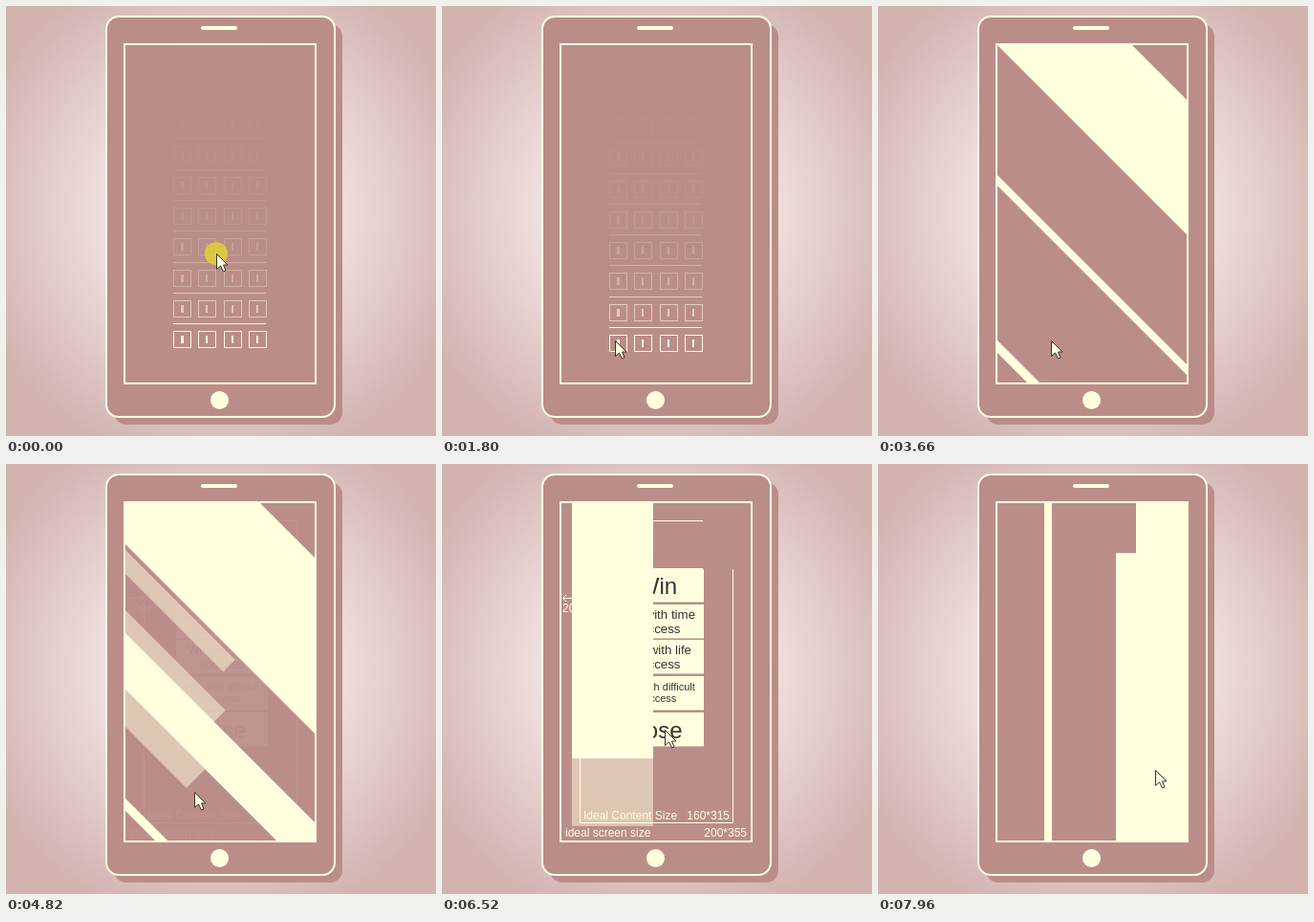
Animation of 450 by 450 pixels, one loop 8000 ms. Source, as an HTML page with a canvas:

```html
<!DOCTYPE html>
<html lang="en">
<head>
<meta charset="utf-8">
<title>Phone screen flow</title>
<style>
  html, body { margin: 0; width: 100%; height: 100%; overflow: hidden; background: #d2b3b0; }
  canvas { display: block; width: 100vw; height: 100vh; }
</style>
</head>
<body>
<canvas id="stage" width="450" height="450"></canvas>
<script>
const ctx = document.getElementById('stage').getContext('2d');
const ROSE = '#bb8d89', CREAM = '#ffffdf', INK = '#37322f';
const FONT = '"Liberation Sans", Arial, sans-serif';
const LOOP = 8000, STEP = 40, DASH = 240;

const clamp = v => Math.max(0, Math.min(1, v));
const ramp = (t, from, to) => clamp((t - from) / (to - from));
const easeOut = p => 1 - (1 - p) ** 2;
const mix = (a, b, p) => a + (b - a) * p;

function faded(alpha, paint) {
  if (alpha <= 0) return;
  ctx.save();
  ctx.globalAlpha *= alpha;
  paint();
  ctx.restore();
}

function rect(x, y, w, h, color) {
  ctx.fillStyle = color;
  ctx.fillRect(x, y, w, h);
}

function pill(x, y, w, h, radius, color) {
  ctx.fillStyle = color;
  ctx.beginPath();
  ctx.roundRect(x, y, w, h, radius);
  ctx.fill();
}

function frame(x, y, w, h, line, radius = 0) {
  ctx.beginPath();
  ctx.roundRect(x, y, w, h, radius);
  ctx.strokeStyle = CREAM;
  ctx.lineWidth = line;
  ctx.stroke();
}

function label(text, x, y, size = 12, color = CREAM, align = 'left') {
  ctx.font = `${size}px ${FONT}`;
  ctx.textAlign = align;
  ctx.fillStyle = color;
  ctx.fillText(text, x, y);
}

function drawPhone() {
  const glow = ctx.createRadialGradient(224, 215, 110, 224, 215, 270);
  glow.addColorStop(0, '#f0e2e0');
  glow.addColorStop(1, '#d2b3b0');
  rect(0, 0, 450, 450, glow);
  pill(113, 19, 239, 419, 13, ROSE);
  pill(105, 11, 239, 419, 13, ROSE);
  frame(105, 11, 239, 419, 2, 13);
  pill(204, 21, 38, 4, 2, CREAM);
  pill(214, 403, 19, 19, 9.5, CREAM);
}

// Endless list that follows the drag; rows grow dimmer towards the top
function drawKeypad(t) {
  const pitch = 32.3;
  const scroll = 165.3 * easeOut(ramp(t, 0, 900)) % pitch;
  const visible = 1 - ramp(t, 1880, 2400);
  for (let row = 0; row < 10; row++) {
    const y = Math.round(349.2 + scroll - row * pitch);
    const depth = Math.max(0, (353 - y) / pitch);
    faded(visible * 0.57 ** depth * clamp(1 - (y - 353) / 16), () => {
      rect(175, y - 17, 97, 1, CREAM);
      for (let col = 0; col < 4; col++) {
        const x = Math.round(175 + col * 26.4);
        frame(x + 0.5, y - 8.5, 18, 17, 1);
        rect(x + 8, y - 4, col ? 2 : 3, 8, CREAM);
      }
    });
  }
}

function drawButton(text, index) {
  const top = Math.round(109 + index * 37.7), middle = top + 18;
  const lines = text.split('|');
  rect(178, top, 96, 35.5, CREAM);
  if (lines.length === 1) return label(text, 225.5, middle + 8.5, 24, INK, 'center');
  const size = lines[0].length > 14 ? 11 : 13.3;
  lines.forEach((line, i) =>
    label(line, 225.5, Math.round(middle - 3.5 + i * size * 1.15), size, INK, 'center'));
}

function drawMenu() {
  frame(144.5, 59.5, 160, 316, 1);
  ctx.stroke(new Path2D('M127 140.5H143M130 137l-3.5 3.5 3.5 3.5M139 137l3.5 3.5-3.5 3.5'));
  label('20px', 126, 155);
  label('Ideal Content Size', 148, 372);
  label('160*315', 301, 372, 12, CREAM, 'right');
  label('ideal screen size', 129, 390);
  label('200*355', 319, 390, 12, CREAM, 'right');
  ['Win', 'Win with time|success', 'Win with life|success', 'Win with difficult|success', 'Lose']
    .forEach(drawButton);
}

// A streak shoots along its lane, then its tail follows and clears it
function streak(t, lo, hi, enter, leave, reach, color = CREAM) {
  const head = reach * easeOut(ramp(t, enter, enter + DASH));
  const tail = reach * easeOut(ramp(t, leave, leave + DASH));
  if (head > tail) rect(lo, tail, hi - lo, head - tail, color);
}

// Lanes: from, to, and the times of entry and exit where they break the rhythm
const slanted = [
  [147, 225], [108, 129], [-63, -52], [-52, -28, , 2560], [-169, -138, , 2940],
  [84, 148, 3430], [-238, -225, 3430], [-111, -62, 4160], [41, 85, 4410]
];
const glints = [[10, 35], [-86, -28], [-150, -111]];

function drawSlanted(t) {
  ctx.save();
  ctx.transform(0.5, -0.5, 0.5, 0.5, 0, 0);
  slanted.forEach(([lo, hi, enter, leave], i) =>
    streak(t, lo, hi, enter ?? 1900 + i * 80, leave ?? 4840 + i * 55, 800));
  faded(0.5 * (1 - ramp(t, 4840, 5300)), () =>
    glints.forEach(([lo, hi], i) => streak(t, lo, hi, 4720 - i * 10, 5100, 800)));
  ctx.restore();
}

const upright = [
  [136, 221, 6430, 6900], [142, 174, 6960, 7400], [174, 182, 6960],
  [182, 249, 7100, 7560], [249, 270, 7200, 7945], [270, 325, 7200]
];

function drawUpright(t) {
  ctx.save();
  ctx.translate(0, 40);
  [273, 221, 124].forEach((lo, i, edges) =>
    streak(t, lo, edges[i - 1] ?? 324, 6500 + i * 60, LOOP, 440, ROSE));
  faded(0.5, () => streak(t, 136, 221, 6395, 6900, 440));
  upright.forEach(([lo, hi, enter, leave = LOOP]) => streak(t, lo, hi, enter, leave, 440));
  ctx.restore();
}

const path = [
  [0, 220, 260], [700, 220, 410], [1600, 181, 351], [4200, 181, 351],
  [4820, 198, 344], [5800, 223, 294], [6520, 233, 279], [7960, 290, 321], [LOOP, 290, 321]
];

function drawPointer(t) {
  const next = path.findIndex(([time]) => time > t);
  const [t0, x0, y0] = path[next - 1], [t1, x1, y1] = path[next];
  const p = ramp(t, t0, t1);
  const x = Math.round(mix(x0, x1, p)), y = Math.round(mix(y0, y1, p));
  faded(0.85 * (1 - ramp(t, 640, 760)), () => pill(x - 12, y - 13, 24, 24, 12, '#e2d136'));
  ctx.save();
  ctx.translate(x + 0.5, y - 0.5);
  const arrow = new Path2D('M0 0V16L4 12.5 7 18.5 9.5 17.5 7 11.5H11.5Z');
  ctx.fillStyle = CREAM;
  ctx.fill(arrow);
  ctx.strokeStyle = INK;
  ctx.lineWidth = 1;
  ctx.stroke(arrow);
  ctx.restore();
}

function draw(t) {
  drawPhone();
  ctx.save();
  ctx.beginPath();
  ctx.rect(124, 40, 201, 355);
  ctx.clip();
  drawKeypad(t);
  if (t < 6900) faded(ramp(t, 4760, 5400), drawMenu);
  drawSlanted(t);
  drawUpright(t);
  ctx.restore();
  frame(124, 40, 200, 355, 2);
  drawPointer(t);
}

const start = performance.now();
function tick() {
  const t = (performance.now() - start) % LOOP;
  draw(Math.floor(t / STEP) * STEP);
  requestAnimationFrame(tick);
}
tick();
</script>
</body>
</html>
```
